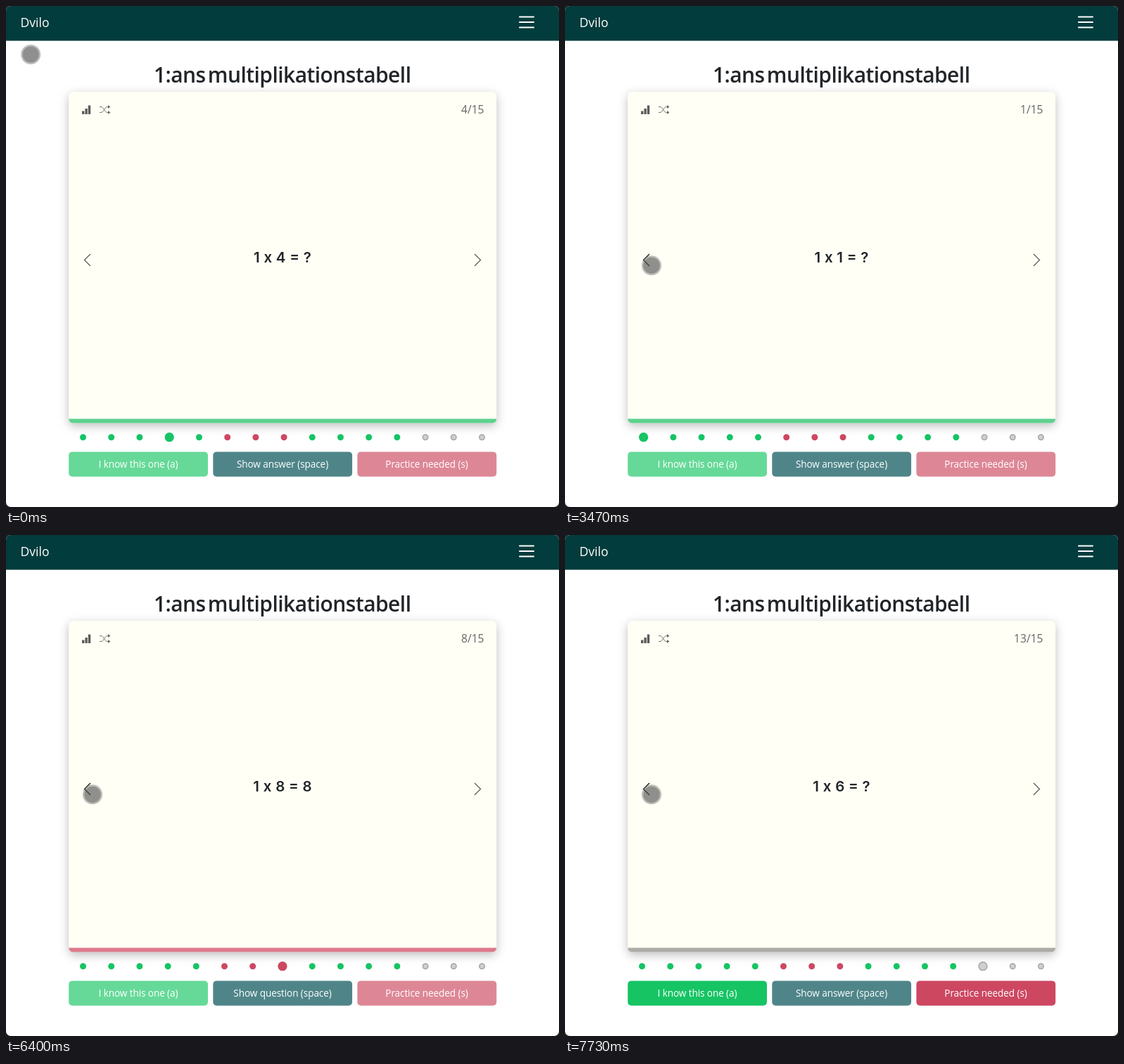
An HTML page for the animation above (8000 ms loop, 786 px wide and 713 px high).

```html
<!DOCTYPE html>
<html lang="sv">
<head>
<meta charset="utf-8">
<title>Flashcards</title>
<style>
  html, body { margin: 0; width: 100%; height: 100%; overflow: hidden; background: #202124; }
  svg { display: block; width: 786px; height: 713px; font-family: "Open Sans", "Noto Sans", sans-serif; }
  .mid { text-anchor: middle; }
  .title { font-size: 30px; font-weight: 600; letter-spacing: -.55px; word-spacing: -4px; fill: #212529; }
  .card { fill: #fffff5; filter: drop-shadow(0 4px 7px rgba(0, 0, 0, .26)); }
  .question { font: 600 20.5px Inter, sans-serif; word-spacing: .6px; fill: #212529; }
  .count { font-size: 15.6px; text-anchor: end; fill: #666663; }
  .label { font-size: 13.6px; letter-spacing: -.1px; fill: #fff; }
  .line { fill: none; stroke: #5c5c59; stroke-width: 1.3; }
</style>
</head>
<body>
<svg viewBox="0 0 786 713">
  <rect width="786" height="713" rx="7" fill="#fff"/>
  <path d="M0 49.5V7a7 7 0 0 1 7-7H779a7 7 0 0 1 7 7V49.5z" fill="#033c3d"/>
  <text x="20.5" y="30" font-size="17.5" fill="#fff">Dvilo</text>
  <path d="M730 15.5h20m-20 7.5h20m-20 7.5h20" stroke="#fff" stroke-width="2" stroke-linecap="round"/>
  <text class="mid title" x="392.7" y="109">1:ans multiplikationstabell</text>

  <rect class="card" x="89.2" y="122" width="608" height="471.5" rx="7"/>
  <path id="bar" d="M89.2 587.5h608a6 6 0 0 1-6 6h-596a6 6 0 0 1-6-6z"/>
  <path d="M108 149.5h3.4v4.5h-3.4zM112.4 146h3.4v8h-3.4zM116.8 141.5h3.4v12.5h-3.4z" fill="#5c5c59"/>
  <path class="line" style="stroke: #777773; stroke-width: 1" d="M133 143.5h2c4 0 5 8 9 8h2M133 151.5h2c4 0 5-8 9-8h2"/>
  <path d="M145 141l3.4 2.5-3.4 2.5zM145 149l3.4 2.5-3.4 2.5z" fill="#666663"/>
  <text id="count" class="count" x="679.5" y="153"></text>
  <path id="prev" class="line" d="M120 353l-8.5 8.5 8.5 8.5"/>
  <path class="line" d="M666 353l8.5 8.5-8.5 8.5"/>
  <text id="question" class="mid question" x="393" y="365"></text>

  <g id="dots"></g>

  <rect id="know" x="89.2" y="634.4" width="197.8" height="35.3" rx="5"/>
  <rect x="294.3" y="634.4" width="197.8" height="35.3" rx="5" fill="#4f8589"/>
  <rect id="practice" x="499.4" y="634.4" width="197.8" height="35.3" rx="5"/>
  <g class="mid label">
    <text x="188" y="657">I know this one (a)</text>
    <text id="flip" x="393" y="657"></text>
    <text x="598" y="657">Practice needed (s)</text>
  </g>

  <g id="cursor">
    <circle r="14" fill="#5a5a5a" fill-opacity=".4"/>
    <circle r="11.6" fill="#4b4b4b" fill-opacity=".4"/>
  </g>
</svg>
<script>
  const LOOP = 8000, TOTAL = 15;
  const GREEN = '#16c464', RED = '#cd4761', GREY = '#cfcfcf';
  const BARS = { [GREEN]: '#5dd18d', [RED]: '#dc7a8b', [GREY]: '#adaca7' };
  const FACTORS = [1, 2, 3, 4, 5, 6, 7, 8, 9, 10, 11, 12, 6];
  // [start ms, card number]
  const STEPS = [
    [0, 4], [2800, 3], [3270, 2], [3470, 1], [3930, 2], [4130, 3], [4530, 4], [4730, 5],
    [4870, 6], [5530, 7], [5730, 8], [7070, 9], [7270, 10], [7430, 11], [7600, 12], [7730, 13]
  ];

  const $ = id => document.getElementById(id);
  const fill = (id, color) => $(id).setAttribute('fill', color);
  const clamp = v => Math.min(1, Math.max(0, v));
  const status = n => n > 12 ? GREY : n > 5 && n < 9 ? RED : GREEN;

  const dots = Array.from({ length: TOTAL }, (_, i) => {
    const dot = document.createElementNS('http://www.w3.org/2000/svg', 'circle');
    const color = status(i + 1);
    dot.setAttribute('cy', 613.7);
    dot.setAttribute('fill', color);
    dot.setAttribute('stroke', color === GREY ? '#a6a6a6' : color);
    dot.setAttribute('stroke-width', 1.5);
    return $('dots').appendChild(dot);
  });

  function showCard(n, flipped) {
    const color = status(n), factor = FACTORS[n - 1], rated = color !== GREY;
    $('count').textContent = `${n}/${TOTAL}`;
    $('question').textContent = `1 x ${factor} = ${flipped ? factor : '?'}`;
    $('flip').textContent = `Show ${flipped ? 'question' : 'answer'} (space)`;
    fill('bar', BARS[color]);
    fill('know', rated ? '#66d998' : GREEN);
    fill('practice', rated ? '#dd8796' : RED);
    dots.forEach((dot, i) => {
      const side = Math.sign(i - (n - 1));
      dot.setAttribute('cx', 109.5 + 40.2 * i + 2.1 * (side + 1));
      dot.setAttribute('r', side ? 3.75 : 5.9);
    });
  }

  // The pointer moves on a 15 fps grid.
  function moveCursor(t) {
    const tick = Math.floor((t + 4) * .015);
    const a = clamp((tick - 14) / 2), b = clamp((tick - 31) / 7);
    const x = 35.2 + 64.6 * a + 23.2 * b ** 3.05;
    const y = 69 + 54 * a + 246.3 * b ** 1.06;
    $('cursor').setAttribute('transform', `translate(${x} ${y})`);
    $('prev').style.stroke = b === 1 ? '#111' : '';
  }

  let shown = '';
  function draw(now) {
    const t = now % LOOP;
    const n = STEPS.filter(s => s[0] <= t).pop()[1];
    const flipped = t >= 6400 && t < 6730;
    const key = n + ':' + flipped;
    if (key !== shown) showCard(n, flipped);
    shown = key;
    moveCursor(t);
  }

  const start = performance.now();
  function loop() {
    draw(performance.now() - start);
    requestAnimationFrame(loop);
  }
  loop();
</script>
</body>
</html>
```
